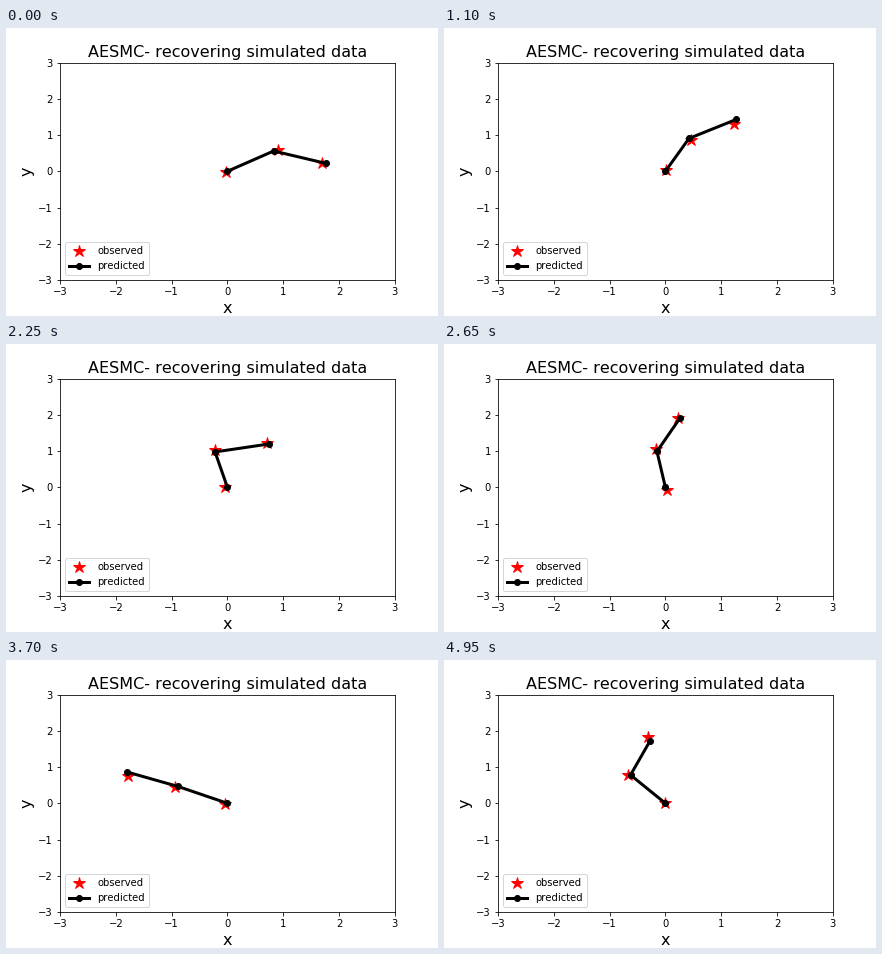
Write a matplotlib script that moves like this. It is 432 px wide and 288 px high and loops after 5000 ms.

```python
import numpy as np
import matplotlib.pyplot as plt
from matplotlib.animation import FuncAnimation

FRAMES, INTERVAL = 100, 50

plt.rcParams.update({
    "font.family": "DejaVu Sans",
    "font.size": 10,
    "figure.subplot.bottom": 0.125,
    "text.kerning_factor": 6,
})

# Turning points of the swing: time steps and link angles in degrees
STEPS = [0, 8, 13, 25, 31, 38, 45, 52, 61, 69, 76, 82, 87, 99]
UPPER = [34, -38, 9.5, 80, 109, 80, 102.8, 98, 115.6, 140, 155, 152, 165.5, 128.7]
LOWER = [-20, -75, -50.3, 40, 3.1, 50, 12.8, 62, 78.5, 140, 154, 108, 88.3, 69.6]


def smooth(t, knots, values):
    """Cubic Hermite curve through the knots."""
    knots, values = np.array(knots), np.array(values)
    slopes = np.gradient(values, knots)
    i = np.clip(np.searchsorted(knots, t, side="right") - 1, 0, len(knots) - 2)
    h = knots[i + 1] - knots[i]
    u = (t - knots[i]) / h
    return ((1 + 2 * u) * (1 - u) ** 2 * values[i]
            + u * (1 - u) ** 2 * h * slopes[i]
            + u ** 2 * (3 - 2 * u) * values[i + 1]
            - u ** 2 * (1 - u) * h * slopes[i + 1])


def arm_joints():
    """Base, elbow and tip of the two unit links for every time step."""
    joints = np.zeros((FRAMES, 3, 2))
    for k, angles in enumerate((UPPER, LOWER), start=1):
        angle = np.radians(smooth(np.arange(FRAMES), STEPS, angles))
        link = np.column_stack((np.cos(angle), np.sin(angle)))
        joints[:, k] = joints[:, k - 1] + link
    return joints


predicted = arm_joints()
noise = np.random.default_rng(4).normal(0, 0.05, predicted.shape)
observed = predicted + np.clip(noise, -0.12, 0.12)

fig, ax = plt.subplots(figsize=(6, 4), dpi=72)
stars, = ax.plot([], [], "r*", markersize=12, label="observed")
arm, = ax.plot([], [], "ko-", linewidth=3, markersize=6, label="predicted")
ax.set(xlim=(-3, 3), ylim=(-3, 3))
ax.set_title("AESMC- recovering simulated data", fontsize=16)
ax.set_xlabel("x", fontsize=16)
ax.set_ylabel("y", fontsize=16)
ax.legend(loc="lower left")


def draw(step):
    stars.set_data(*observed[step].T)
    arm.set_data(*predicted[step].T)
    return stars, arm


anim = FuncAnimation(fig, draw, frames=FRAMES, interval=INTERVAL,
                     repeat=True, repeat_delay=0)
plt.show()
```
